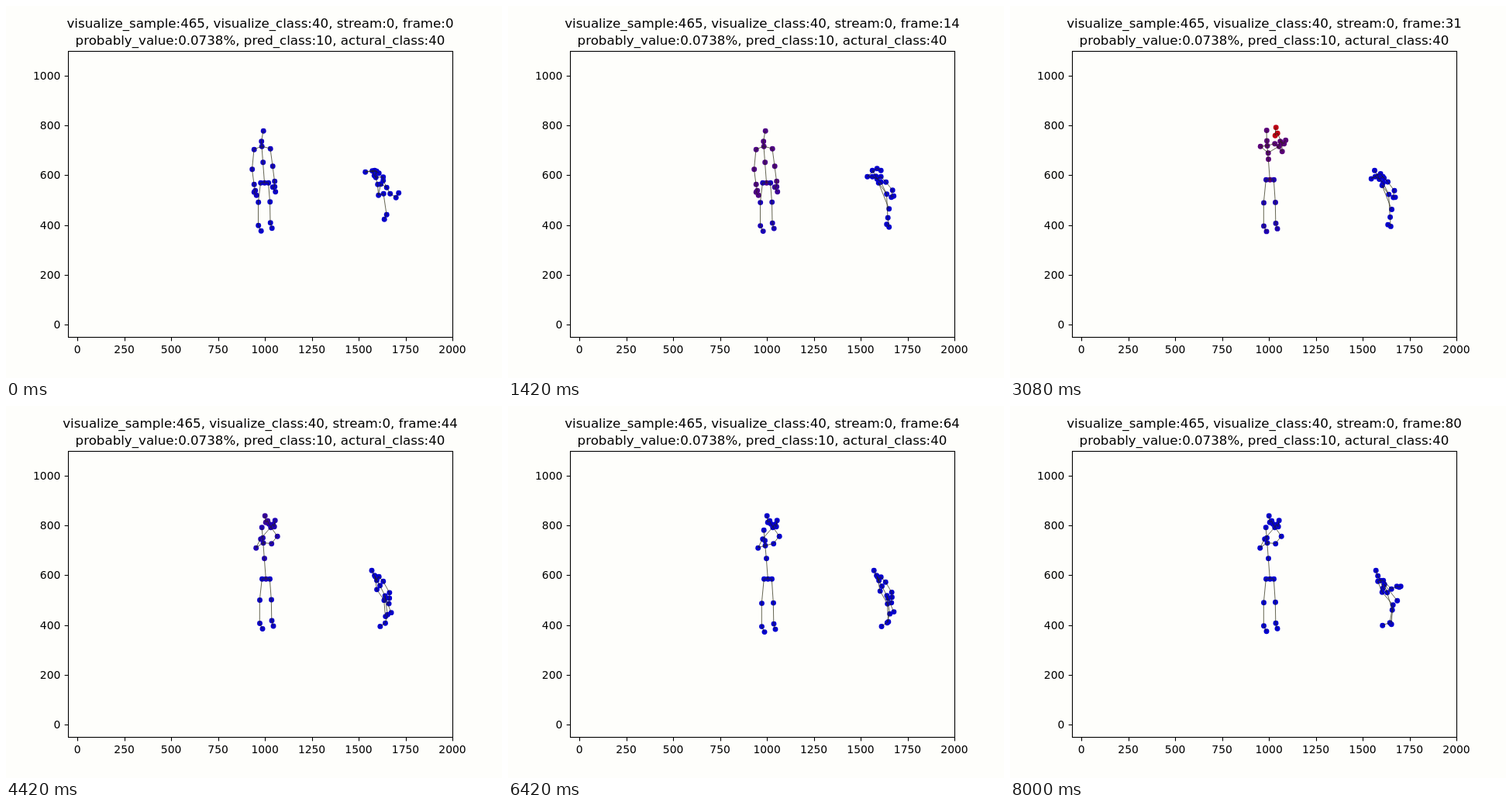
These frames come from a looping animation (640x480 px, 8080 ms). An HTML page with a canvas:

```html
<!DOCTYPE html>
<html lang="en">
<head>
<meta charset="utf-8">
<title>Skeleton plot</title>
<style>
  html, body { margin: 0; width: 100%; height: 100%; overflow: hidden; background: #fefefb; }
  canvas { display: block; }
</style>
</head>
<body>
<canvas id="stage" width="640" height="480"></canvas>
<script>
const ctx = document.getElementById('stage').getContext('2d');
const LOOP = 8080;
const BOX = { left: 80, top: 57.6, right: 576, bottom: 427.2 };

// Moments at which the curves below have a value
const KEYS = [0, 14, 31, 44, 52, 64, 80];

// Standing figure: head, neck, chest, mid, base, then hip to foot of each leg
const BODY = [
  332,161, 329.5,174.5, 330,181, 331.5,201.5, 333.5,228,
  328.5,228, 325.5,253, 325.5,283, 329,290,
  338.5,228, 340.5,252.5, 341,279.5, 343,286.5
];
// Both arms: shoulder, elbow, wrist, hand, thumb, tip
const ARMS_DOWN = [
  320,185, 317.5,210.5, 320,230, 321.5,238, 320,240, 323,244,
  341,184, 344,206.5, 346.5,226, 346.5,233, 344,233.5, 347.5,239.5
];
const ARMS_BENT = [
  323,181, 333,189.5, 347,181, 348.5,174.5, 353.5,177.5, 355.5,173,
  341.5,177.5, 351,187.5, 351,177, 345,164, 342,167, 343,156.5
];
const ARMS_UP = [
  322.5,183, 328.5,171.5, 341.5,156.5, 344.5,152.5, 346,155.5, 347,147.5,
  342.5,177.5, 350,168, 339,152, 337.5,148, 335,150, 334,141.5
];
const ARMS = [ARMS_DOWN, ARMS_BENT, ARMS_UP];
const LIFT = [0, 0, 1, 2, 2, 2, 2];
const HEAD_DY = [0, 0, -.7, -4.5, -3, -1, -4.5];
const HIP_DY = [0, 0, -4, -5, -4.5, -5, -5];
const LEG_DY = [0, .4, .7, -2.7, -3.5, 1.4, .6];

// Seated figure: head to base, arm A (4), arm B (5), leg A (2), leg B (3)
const SIT_OPEN = [
  472.5,212.5, 475,218.5, 477,221, 479.5,230, 480.5,244,
  478,213, 463.5,214, 475.5,212, 481,215.5,
  486.5,220.5, 486.5,225, 495.5,242, 503,247, 506.5,241,
  483.5,229.5, 491,234, 487,242, 491,269, 488,275
];
const SIT_REACH = [
  470,212, 474.5,219.5, 476,223, 481,227, 488.5,242.5,
  470,220, 463.5,220, 476,209.5, 481,212,
  481,220, 487.5,227, 496,237.5, 494.5,246.5, 497.5,245,
  478,228, 491.5,261.5, 490,273, 491.5,285, 488.5,281.5
];
const SIT_DROP = [
  472,212, 475.5,218.5, 478.5,225, 482.5,232, 489,245,
  477,220, 480,238.5, 489,255, 490.5,278,
  481,220, 486.5,226, 494.5,241, 494.5,248, 493.5,256,
  491,250, 497.5,267, 492.5,268.5, 489,279.5, 482,284.5
];
const SIT_POINT = [
  472,212, 474.5,219, 478,225, 481,235, 486.5,240.5,
  474.5,226, 480,240, 494,256.5, 492,281.5,
  481.5,225, 492,236, 499,232.5, 502,233.5, 504,232.5,
  483,230, 499.5,251, 493,263, 490,279.5, 480.5,283
];
const SITS = [SIT_OPEN, SIT_REACH, SIT_DROP, SIT_POINT];
const SIT_STAGE = [0, 1, 1.15, 1.9, 2, 2.1, 3];

// Share of red in the dots
const UPPER_HEAT = [.08, .37, .43, .15, .03, .03, .03];
const HAND_HEAT = [.05, .28, .9, .26, .03, .03, .03];

// A chain of joints hanging from a parent joint
function chain(parent, first, count) {
  return Array.from({ length: count }, (_, i) => [i ? first + i - 1 : parent, first + i]);
}
const STAND_BONES = [
  chain(0, 1, 4), chain(4, 5, 4), chain(4, 9, 4), chain(2, 13, 6), chain(2, 19, 6)
].flat();
const SIT_BONES = [
  chain(0, 1, 4), chain(2, 5, 4), chain(2, 9, 5), chain(4, 14, 2), chain(4, 16, 3)
].flat();

const mix = (a, b, u) => a + (b - a) * u;

function curve(vals, n) {
  let k = 0;
  while (k < KEYS.length - 2 && n >= KEYS[k + 1]) k++;
  return mix(vals[k], vals[k + 1], (n - KEYS[k]) / (KEYS[k + 1] - KEYS[k]));
}

function blend(poses, stage) {
  const k = Math.min(poses.length - 2, Math.floor(stage));
  return poses[k].map((v, i) => mix(v, poses[k + 1][i], stage - k));
}

function line(x1, y1, x2, y2) {
  ctx.beginPath();
  ctx.moveTo(x1, y1);
  ctx.lineTo(x2, y2);
  ctx.stroke();
}

function text(str, x, y, size, align) {
  ctx.font = size + 'px "DejaVu Sans", sans-serif';
  ctx.textAlign = align;
  ctx.fillText(str, x, y);
}

function drawFigure(p, bones, heatOf) {
  for (let j = 0; j < p.length / 2; j++) {
    const h = heatOf(j);
    ctx.fillStyle = `rgb(${Math.round(210 * h)},0,${Math.round(210 * (1 - h))})`;
    ctx.beginPath();
    ctx.arc(p[2 * j] + .2, p[2 * j + 1] + .2, 3.45, 0, 2 * Math.PI);
    ctx.fill();
  }
  ctx.strokeStyle = '#26260c';
  ctx.lineWidth = .7;
  for (const [a, b] of bones) line(p[2 * a], p[2 * a + 1], p[2 * b], p[2 * b + 1]);
}

function drawStanding(n) {
  const lift = curve(LIFT, n);
  const head = curve(HEAD_DY, n), hip = curve(HIP_DY, n), leg = curve(LEG_DY, n);
  const dy = j => {
    if (j < 3) return head;
    return j < 6 || j === 9 ? hip : leg;
  };
  const dx = j => j === 0 ? -lift : Math.min(lift, 1) * 1.8;
  const body = BODY.map((v, i) => v + (i % 2 ? dy(i >> 1) : dx(i >> 1)));
  const upper = curve(UPPER_HEAT, n), hand = curve(HAND_HEAT, n);
  drawFigure(body.concat(blend(ARMS, lift)), STAND_BONES, j => {
    if (j > 21) return hand;
    return j > 4 && j < 13 ? upper / 3 : upper;
  });
}

function drawAxes() {
  const snap = v => Math.round(v) + .5;
  const l = snap(BOX.left), r = snap(BOX.right), t = snap(BOX.top), b = snap(BOX.bottom);
  ctx.strokeStyle = ctx.fillStyle = '#000';
  ctx.lineWidth = 1.11;
  ctx.strokeRect(l, t, r - l, b - t);
  for (let v = 0; v <= 2000; v += 250) {
    const x = BOX.left + (v + 50) / 2050 * (BOX.right - BOX.left);
    line(snap(x), b, snap(x), b + 4.86);
    text(v, x, 448, 13.89, 'center');
  }
  for (let v = 0; v <= 1000; v += 200) {
    const y = BOX.bottom - (v + 50) / 1150 * (BOX.bottom - BOX.top);
    line(l, snap(y), l - 4.86, snap(y));
    text(v, 70.3, Math.round(y + 5), 13.89, 'right');
  }
}

function draw(now) {
  const t = now % LOOP;
  // 10 poses per second shown on a 12 per second clock
  const slot = Math.floor((t + 4) * 12 / 1000);
  const n = Math.min(80, Math.max(0, Math.ceil(slot * 5 / 6 - .5)));
  ctx.fillStyle = '#fefefb';
  ctx.fillRect(0, 0, 640, 480);
  drawStanding(n);
  drawFigure(blend(SITS, curve(SIT_STAGE, n)), SIT_BONES, () => .03);
  drawAxes();
  text('visualize_sample:465, visualize_class:40, stream:0, frame:' + n, 328, 28, 16.67, 'center');
  text('probably_value:0.0738%, pred_class:10, actural_class:40', 328, 50, 16.67, 'center');
}

const start = performance.now();
function tick() {
  draw(performance.now() - start);
  requestAnimationFrame(tick);
}
tick();
</script>
</body>
</html>
```
